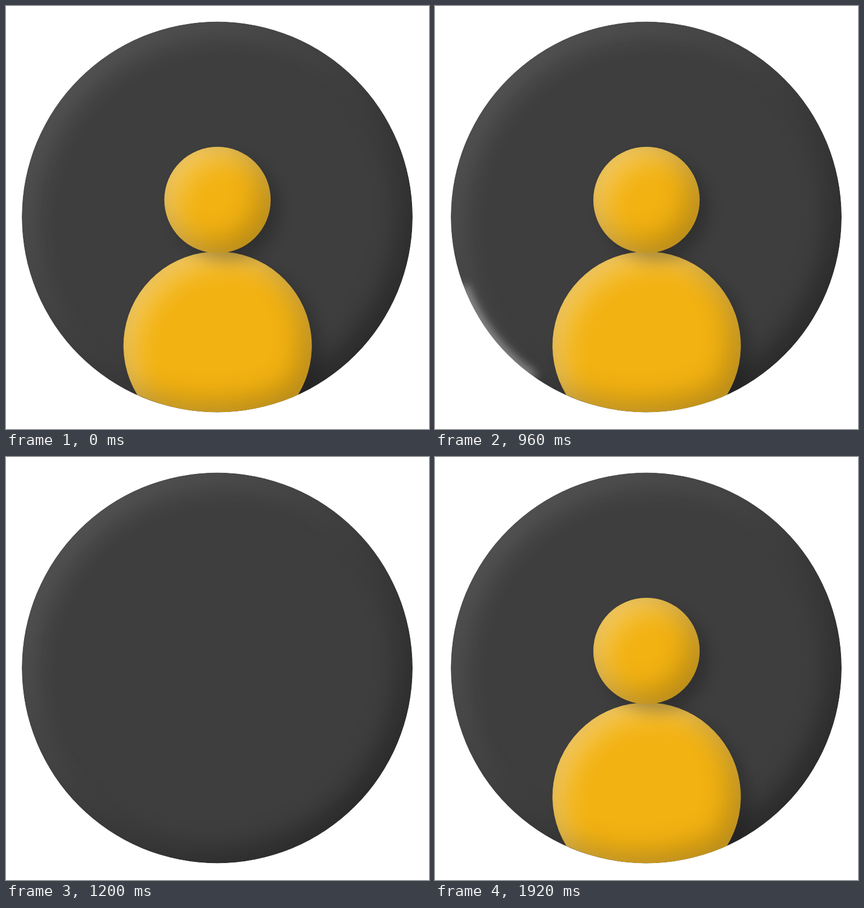
Recreate the animation shown at these times as an HTML page. Size 748 by 748 pixels, loop 2.88 s.

```html
<!DOCTYPE html>
<html lang="en">
<head>
<meta charset="utf-8">
<title>Avatar</title>
<style>
  html, body { margin: 0; width: 100%; height: 100%; overflow: hidden; background: #fff; }
  svg { display: block; width: 100vw; height: 100vh; }
</style>
</head>
<body>
<svg id="stage" viewBox="0 0 748 748"></svg>
<script>
const LOOP = 2880, STEP = 40;
const CX = 373.5, CY = 373, R = 345.5;
const TRAVEL = 553;
const GLOW_FROM = -27, GLOW_TO = 145;

const clamp01 = v => Math.min(1, Math.max(0, v));
const progress = (t, from, to) => clamp01((t - from) / (to - from));
const ease = u => u * u * (3 - 2 * u);
const lerp = (a, b, u) => a + (b - a) * u;

// Blurred inverse of the shape, shifted and kept inside its outline.
const innerShadow = (name, color, alpha, offset) => `
  <feFlood flood-color="${color}" flood-opacity="${alpha}"/>
  <feComposite in2="SourceAlpha" operator="out"/>
  <feGaussianBlur stdDeviation="25"/>
  <feOffset dx="${offset}" dy="${offset}"/>
  <feComposite in2="SourceAlpha" operator="in" result="${name}"/>`;

const clayFilter = (id, light, dark, drop) => `
  <filter id="${id}" filterUnits="userSpaceOnUse" x="-120" y="-120" width="988" height="988"
    color-interpolation-filters="sRGB">
    ${innerShadow('light', '#fff', light, 16)}
    ${innerShadow('dark', '#000', dark, -16)}
    <feGaussianBlur in="SourceAlpha" stdDeviation="13"/>
    <feOffset dx="16" dy="16"/>
    <feComponentTransfer result="drop"><feFuncA type="linear" slope="${drop}"/></feComponentTransfer>
    <feMerge>
      <feMergeNode in="drop"/>
      <feMergeNode in="SourceGraphic"/>
      <feMergeNode in="light"/>
      <feMergeNode in="dark"/>
    </feMerge>
  </filter>`;

const disc = `<circle cx="${CX}" cy="${CY}" r="${R}"`;

document.getElementById('stage').innerHTML = `
  <defs>
    ${clayFilter('discClay', 0.15, 0.4, 0)}
    ${clayFilter('figureClay', 0.38, 0.25, 0.22)}
    <filter id="soft" filterUnits="userSpaceOnUse" x="-60" y="-60" width="868" height="868">
      <feGaussianBlur stdDeviation="8"/>
    </filter>
    <clipPath id="discClip">${disc} shape-rendering="crispEdges"/></clipPath>
  </defs>
  <g clip-path="url(#discClip)">
    ${disc} fill="#3e3e3e" filter="url(#discClay)"/>
    <g filter="url(#soft)">
      <path id="glow" fill="none" stroke="#fff" stroke-opacity=".48" stroke-width="14"/>
    </g>
    <g id="figure" fill="#f2b212">
      <path d="M232.5 688A166.5 166.5 0 1 1 516 688A${R} ${R} 0 0 1 232.5 688Z" filter="url(#figureClay)"/>
      <circle cx="374" cy="343" r="94" filter="url(#figureClay)"/>
    </g>
  </g>`;

const glow = document.getElementById('glow');
const figure = document.getElementById('figure');

// Angles run counter-clockwise from the top of the disc.
function rimPoint(degrees) {
  const a = degrees * Math.PI / 180;
  return `${CX - R * Math.sin(a)} ${CY - R * Math.cos(a)}`;
}

function render(t) {
  const head = lerp(GLOW_FROM, GLOW_TO, progress(t, 0, 480));
  const tail = lerp(GLOW_FROM, GLOW_TO, progress(t, 0, 1200));
  glow.setAttribute('d', head > tail
    ? `M${rimPoint(tail)}A${R} ${R} 0 0 0 ${rimPoint(head)}` : '');

  const sunk = ease(progress(t, 960, 1200)) - ease(progress(t, 1640, 1920));
  figure.setAttribute('transform', `translate(0 ${TRAVEL * sunk})`);
}

const start = performance.now();
let shown = -1;
function tick() {
  const t = Math.floor(((performance.now() - start) % LOOP) / STEP) * STEP;
  if (t !== shown) render(shown = t);
  requestAnimationFrame(tick);
}
tick();
</script>
</body>
</html>
```
